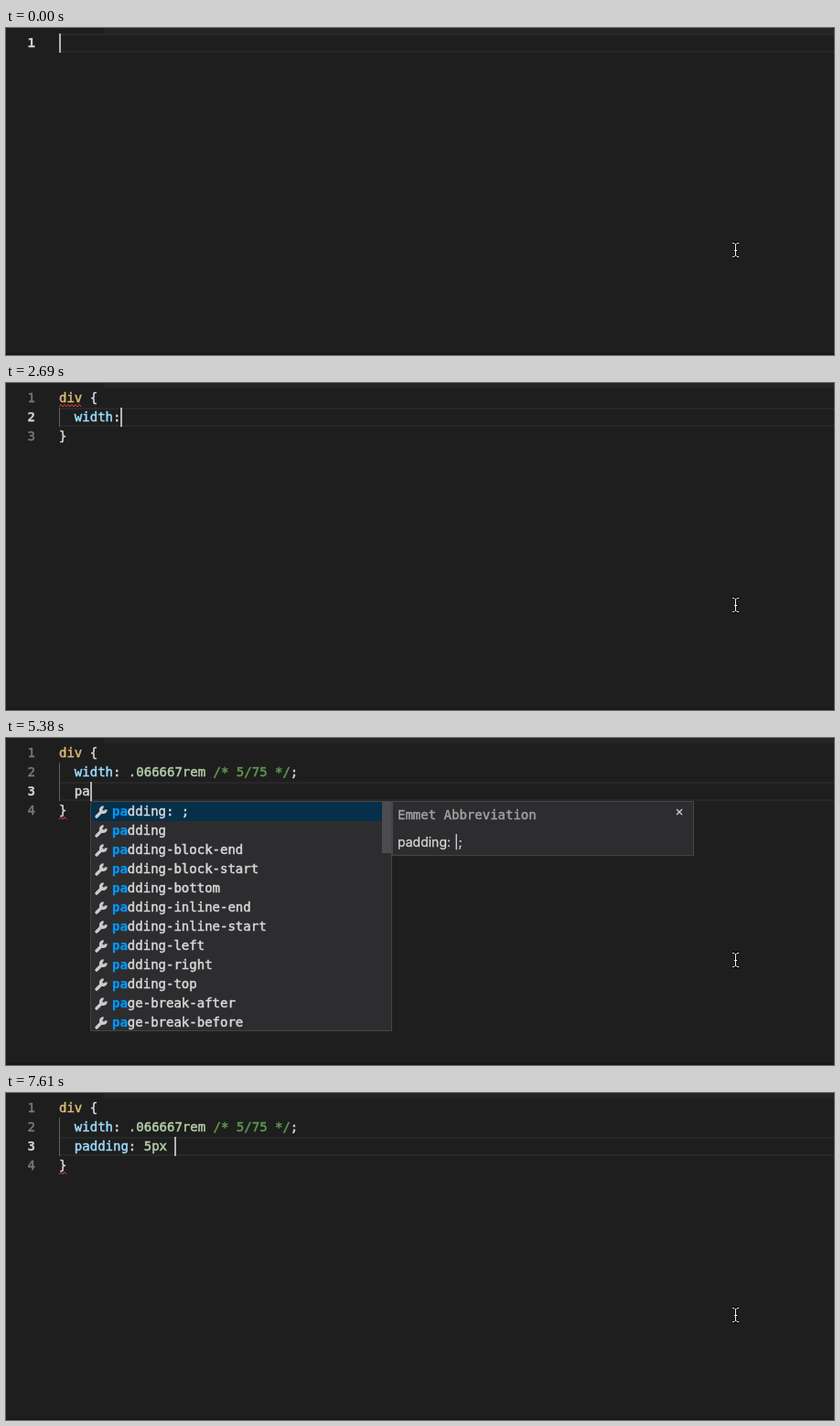
Write an HTML page with a canvas that moves like this. It is 905x358 px and loops after 8000 ms.

```html
<!DOCTYPE html>
<html lang="en">
<head>
<meta charset="utf-8">
<title>Editor autocomplete</title>
<style>
  html, body { margin: 0; width: 100%; height: 100%; overflow: hidden; background: #1e1e1e; }
  canvas { display: block; }
</style>
</head>
<body>
<canvas id="stage" width="905" height="358"></canvas>
<script>
const ctx = document.getElementById('stage').getContext('2d');
const MONO = '14px "DejaVu Sans Mono", monospace';
const SANS = '14px Inter, sans-serif';
const LOOP = 8000, LEFT = 58, TOP = 6, ROW = 21, PANEL = 330, MAX_ROWS = 12;
const TEXT = '#d8d8d8';

// [start time, text with "|" as caret, suggestions open]
const WIDTH = 'div {\n  width: ';
const DONE = WIDTH + '.066667rem /* 5/75 */';
const PAD = DONE + ';\n  ';
const steps = [
  [0, '|'], [150, 'd|'], [300, 'd|', 1], [450, 'di|', 1], [600, 'div|', 1], [750, 'div |'],
  [1200, 'div {|}'], [1500, 'div {\n  |\n}'],
  ...['w', 'wi', 'wid'].map((s, i) => [1800 + i * 150, `div {\n  ${s}|\n}`, 1]),
  [2390, 'div {\n  widt|\n}', 1], [2540, 'div {\n  width|\n}', 1],
  [2690, 'div {\n  width:|\n}'], [2990, WIDTH + '|\n}'], [3140, WIDTH + '5|\n}'],
  [3440, WIDTH + '5p|\n}', 1], [3740, WIDTH + '5px|\n}', 1],
  [4190, DONE + '|\n}'], [4630, DONE + ';|\n}'], [4930, PAD + '|\n}'],
  ...['p', 'pa', 'pad', 'padd', 'paddi', 'padding'].map((s, i) => [5230 + i * 146, `${PAD}${s}|\n}`, 1]),
  [6270, PAD + 'padding:|\n}'], [6570, PAD + 'padding: |\n}'], [6710, PAD + 'padding: 5|\n}'],
  [7010, PAD + 'padding: 5p|\n}', 1], [7310, PAD + 'padding: 5px|\n}', 1], [7610, PAD + 'padding: 5px |\n}'],
];

const words = s => s.split(' ');
const tags = words('data datalist dd del details dfn dialog div dl dt address aside audio');
const sides = words('block-end block-start bottom image inline-end inline-start left right top');
const properties = [
  'widows', 'width', 'will-change', 'word-break', 'word-spacing', 'word-wrap', 'writing-mode',
  ...sides.map(s => `border-${s}-width`), 'border-width', 'column-rule-width', 'max-width', 'min-width',
  'padding', ...sides.filter(s => s !== 'image').map(s => 'padding-' + s),
  'page-break-after', 'page-break-before', 'perspective', 'position', '-webkit-padding-start',
];
const units = ['5px -> .066667rem', '5pc', '5pt', '5px'];
const emmet = { w: 'width', wi: 'width', wid: 'widows', p: 'padding', pa: 'padding', pad: 'padding' };
const docs = {
  width: ['Specifies the width of the content area, padding', "area or border area (depending on 'box-sizing')",
    'of certain boxes.', '', 'Syntax: <viewport-length>{1,2}'],
  padding: ['Shorthand property to set values the', 'thickness of the padding area. If left is omitted,',
    'it is the same as right. If bottom is omitted it is', 'the same as top, if right is omitted it is the same',
    'as top. The value may not be negative.', '', 'Syntax: [ <length> | <percentage> ]{1,4}'],
  [units[0]]: ['5px -> .066667rem'],
};

function rect(x, y, w, h, color) {
  ctx.fillStyle = color;
  ctx.fillRect(x, y, w, h);
}

// A thin outline gives the text its medium weight.
function write(s, x, y, color = TEXT, font = MONO) {
  ctx.font = font;
  ctx.fillStyle = ctx.strokeStyle = color;
  ctx.lineWidth = font === MONO ? 0.5 : 0.25;
  ctx.fillText(s, x, y);
  ctx.strokeText(s, x, y);
  return x + ctx.measureText(s).width;
}

function frameBox(x, y, w, h) {
  rect(x, y, w, h, '#454548');
  rect(x + 1, y + 1, w - 2, h - 2, '#2d2d30');
}

function path(points, color, width) {
  ctx.beginPath();
  points.forEach(([x, y]) => ctx.lineTo(x, y));
  ctx.strokeStyle = color;
  ctx.lineWidth = width;
  ctx.stroke();
}

function wrench(x, y) {
  ctx.lineCap = 'round';
  path([[x + 2, y + 12], [x + 8, y + 6]], '#cccccc', 3.4);
  ctx.lineCap = 'butt';
  ctx.beginPath();
  ctx.arc(x + 9.3, y + 4.7, 2.9, -0.1, Math.PI * 1.53);
  ctx.lineWidth = 3;
  ctx.stroke();
}

function tagIcon(x, y) {
  [8, 5, 9, 6].forEach((w, i) => {
    rect(x, y + 1 + i * 3, w, 1, i % 2 ? '#e0b8a8' : '#d0d0d0');
    rect(x + w + 2, y + 1 + i * 3, 12 - w, 1, i % 2 ? '#d0d0d0' : '#e0b8a8');
  });
  rect(x, y + 13, 8, 1, '#d0d0d0');
}

function squiggle(x, y, width) {
  const points = [];
  for (let i = 0; i <= width; i += 2) points.push([x + i, y + (i % 4 ? 0.5 : 3)]);
  path(points, '#e5403c', 1);
}

const colors = { comment: '#5d9950', tag: '#deb974', property: '#9cdcfe', number: '#b5cea8', plain: TEXT };
const syntax = /(?<comment>\/\*.*\*\/)|(?<tag>^div)|(?<property>\b(?:width|padding)\b)|(?<number>\.?\d+(?:rem|px)?)|(?<plain>.)/g;

function codeLine(line, y) {
  let x = LEFT;
  for (const { groups } of line.matchAll(syntax)) {
    const kind = Object.keys(groups).find(k => groups[k]);
    x = write(groups[kind], x, y + 15, colors[kind]);
  }
}

function docPanel(x, y, label, abbreviation) {
  const lines = docs[label];
  if (!abbreviation && !lines) return;
  frameBox(x, y, PANEL, abbreviation ? 60 : 10 + lines.length * ROW);
  if (abbreviation) {
    write('Emmet Abbreviation', x + 6, y + 20, '#a0a0a1');
    write(abbreviation + ': |;', x + 6, y + 50, TEXT, SANS);
  } else {
    lines.forEach((line, i) => write(line, x + 6, y + 21 + i * ROW, TEXT, SANS));
  }
  const cx = x + PANEL - 16, cy = y + 12;
  path([[cx - 3, cy - 3], [cx + 3, cy + 3]], '#c8c8c8', 1.4);
  path([[cx + 3, cy - 3], [cx - 3, cy + 3]], '#c8c8c8', 1.4);
}

function suggestions(x, y, query, inTag) {
  const source = inTag ? tags : query[0] === '5' ? units : properties;
  const found = source.filter(s => s.includes(query))
    .sort((a, b) => !a.startsWith(query) - !b.startsWith(query));
  const abbreviation = !inTag && emmet[query];
  if (abbreviation) found.unshift(abbreviation + ': ;');
  const shown = found.slice(0, MAX_ROWS), width = inTag ? 430 : PANEL;
  const height = shown.length * ROW;
  frameBox(x, y, width, height);
  rect(x + 1, y + 1, width - 2, Math.min(ROW, height - 2), '#062f4a');
  shown.forEach((label, i) => {
    const top = y + i * ROW, at = label.indexOf(query), end = at + query.length;
    (inTag ? tagIcon : wrench)(x + 5, top + 5);
    let tx = write(label.slice(0, at), x + 24, top + 16);
    tx = write(query, tx, top + 16, '#0097fb', 'bold ' + MONO);
    write(label.slice(end), tx, top + 16);
  });
  if (found.length > MAX_ROWS) rect(x + width - 11, y + 1, 10, 56, '#4c4c4e');
  if (!inTag) docPanel(x + PANEL, y, found[0], abbreviation);
}

function mouse() {
  for (const [color, width] of [['#000', 3], ['#fff', 1]]) {
    path([[794, 235.5], [796, 235.5], [797.5, 237], [799, 235.5], [801, 235.5]], color, width);
    path([[797.5, 237], [797.5, 249]], color, width);
    path([[794, 250.5], [796, 250.5], [797.5, 249], [799, 250.5], [801, 250.5]], color, width);
    path([[796, 243.5], [799, 243.5]], color, width);
  }
}

function draw(t) {
  const [, text, open] = steps.findLast(s => s[0] <= t);
  const lines = text.split('\n');
  const current = lines.findIndex(line => line.includes('|'));
  const before = lines[current].split('|')[0];
  const y = TOP + current * ROW;

  rect(0, 0, 905, 358, '#1e1e1e');
  rect(107, 0, 798, 6, '#252526');
  rect(0, 356, 905, 2, '#191819');
  rect(LEFT, y, 847, ROW, '#282828');
  rect(LEFT, y + 2, 847, ROW - 4, '#1e1e1e');

  lines.forEach((line, i) => {
    const top = TOP + i * ROW, active = i === current;
    write(i + 1, 23.6, top + 15, active ? '#d0d0d0' : '#7a7a7a', (active ? 'bold ' : '') + MONO);
    if (line.startsWith('  ')) rect(LEFT, top, 1, ROW, '#606060');
    codeLine(line.replace('|', ''), top);
  });
  if (t >= 1500 && t < 4340) squiggle(LEFT, TOP + 17, 25);
  if (t >= 5230) squiggle(LEFT, TOP + 3 * ROW + 17, 8);

  ctx.font = MONO;
  const x = Math.round(LEFT + ctx.measureText(before).width);
  rect(x, y, 2, ROW, '#b4b5b3');
  if (open) suggestions(x, y + ROW, before.match(/\w+$/)[0], current === 0);
  mouse();
}

function tick() {
  draw(performance.now() % LOOP);
  requestAnimationFrame(tick);
}
tick();
</script>
</body>
</html>
```
